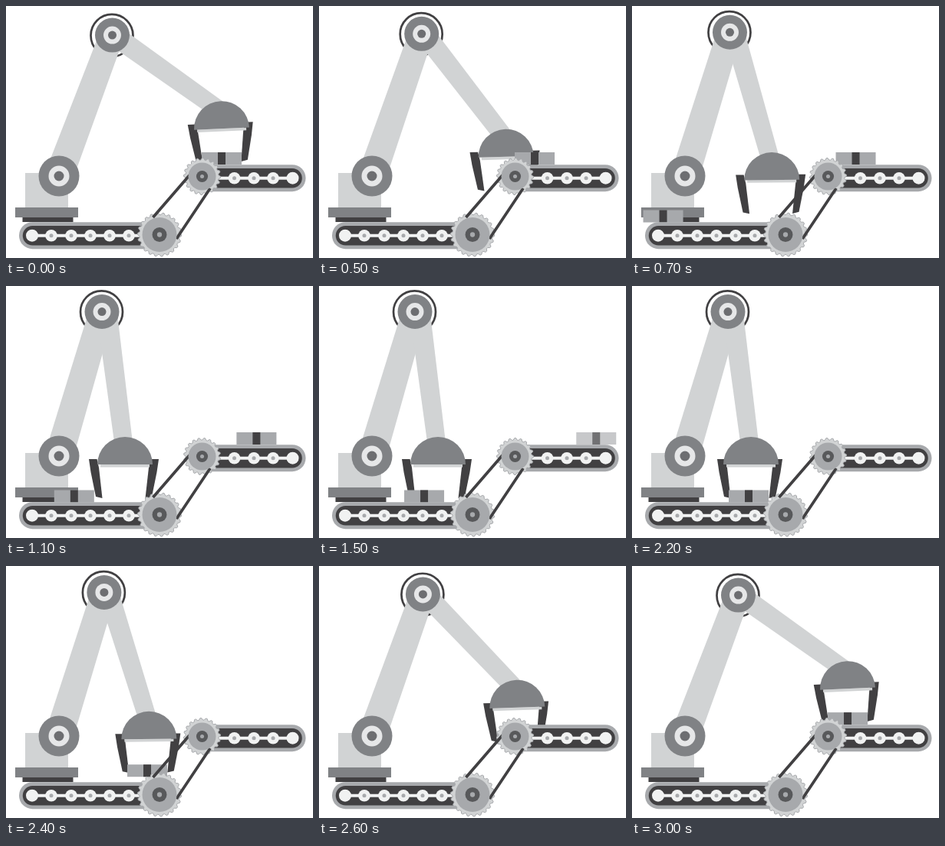
Write an HTML page with a canvas that moves like this. It is 400 px wide and 329 px high and loops after 3100 ms.

```html
<!DOCTYPE html>
<html lang="en">
<head>
<meta charset="utf-8">
<title>Robot arm and conveyors</title>
<style>
  html, body { margin: 0; width: 100%; height: 100%; overflow: hidden; background: #fff; }
  canvas { display: block; }
</style>
</head>
<body>
<canvas id="stage" width="400" height="329"></canvas>
<script>
const ctx = document.getElementById('stage').getContext('2d');
const LOOP = 3100;
const DARK = '#414042', STEEL = '#808285', MID = '#a7a9ac', LIGHT = '#d1d3d4', PALE = '#f1f2f2';
const SHOULDER = [69, 222], UPPER_LENGTH = 196.6, FORE_LENGTH = 170.3;

const lerp = (a, b, k) => a + (b - a) * k;
const ramp = (t, start, end) => Math.min(1, Math.max(0, (t - start) / (end - start)));
const smooth = k => k * k * (3 - 2 * k);
const radians = degrees => degrees * Math.PI / 180;

function rect(x, y, w, h, color) {
  ctx.fillStyle = color;
  ctx.fillRect(x, y, w, h);
}

function disc(x, y, r, color) {
  ctx.fillStyle = color;
  ctx.beginPath();
  ctx.arc(x, y, r, 0, 2 * Math.PI);
  ctx.fill();
}

function polygon(points, color) {
  ctx.fillStyle = color;
  ctx.beginPath();
  points.forEach(p => ctx.lineTo(...p));
  ctx.closePath();
  ctx.fill();
}

function line(x1, y1, x2, y2, width, color) {
  ctx.strokeStyle = color;
  ctx.lineWidth = width;
  ctx.beginPath();
  ctx.moveTo(x1, y1);
  ctx.lineTo(x2, y2);
  ctx.stroke();
}

// Limb outline in its own frame: x along the limb, y across it
function limb([x, y], angle, points) {
  ctx.save();
  ctx.translate(x, y);
  ctx.rotate(angle);
  polygon(points, LIGHT);
  ctx.restore();
}

function joint([x, y], r) {
  disc(x, y, r, STEEL);
  disc(x, y, r * 0.51, '#e6e7e8');
  disc(x, y, r * 0.245, '#6d6e71');
}

function conveyor(left, right, y, rollers, endRoller, gearX) {
  ctx.lineCap = 'round';
  line(left + 17.5, y, right - 17.5, y, 35, MID);
  line(left + 17.5, y, right - 17.5, y, 25.5, DARK);
  ctx.lineCap = 'butt';
  line(endRoller, y, gearX, y, 4, PALE);
  disc(endRoller, y, 8, PALE);
  for (const x of rollers) {
    disc(x, y, 7.8, PALE);
    disc(x, y, 2.5, MID);
  }
}

function teeth(x, y, r, count, turn) {
  const points = [];
  for (let i = 0; i < count * 4; i++) {
    const a = turn + i * Math.PI / (2 * count);
    const radius = i % 4 < 2 ? r : r - 2.5;
    points.push([x + radius * Math.cos(a), y + radius * Math.sin(a)]);
  }
  polygon(points, LIGHT);
  ctx.strokeStyle = MID;
  ctx.lineWidth = 1;
  ctx.stroke();
}

function hub(x, y, r) {
  disc(x, y, r, MID);
  disc(x, y, r * 0.42, '#58595b');
  disc(x, y, r * 0.14, MID);
}

function box(x, y, alpha) {
  ctx.globalAlpha = alpha;
  rect(x, y, 52, 16, MID);
  rect(x + 21, y, 10, 16, DARK);
  ctx.globalAlpha = 1;
}

function claw(side, open) {
  const shape = [[42.5, -7], [32, -7], [29.5, 4], [25, 44], [33.5, 42], [40, 10]];
  polygon(shape.map(([x, y]) => [side * (x + 3 * open) - 1.5, y]), DARK);
}

function head(x, y, tilt, open) {
  ctx.save();
  ctx.translate(x, y);
  ctx.rotate(tilt);
  claw(-1, open);
  claw(1, open);
  rect(-32, 0, 64, 3.5, LIGHT);
  ctx.fillStyle = STEEL;
  ctx.beginPath();
  ctx.arc(0, 0, 36, Math.PI, 2 * Math.PI);
  ctx.fill();
  ctx.restore();
}

// reach: 0 over the lower belt, 1 over the upper belt
function arm(reach, open) {
  const upper = radians(lerp(16.55, 20.7, reach));
  const fore = radians(lerp(10.9, 58.2, reach));
  const elbow = [SHOULDER[0] + UPPER_LENGTH * Math.sin(upper), SHOULDER[1] - UPPER_LENGTH * Math.cos(upper)];
  const pivot = [elbow[0] + 4, elbow[1] + 5];
  const x = pivot[0] + FORE_LENGTH * Math.sin(fore) - 6.2;
  const y = pivot[1] + FORE_LENGTH * Math.cos(fore) + 27.3;

  ctx.strokeStyle = DARK;
  ctx.lineWidth = 2.7;
  ctx.beginPath();
  ctx.arc(elbow[0] - 0.5, elbow[1] + 0.3, 27.5, 0, 2 * Math.PI);
  ctx.stroke();

  limb(SHOULDER, upper - Math.PI / 2, [[0, -18.5], [UPPER_LENGTH, -16.5], [UPPER_LENGTH, 15.5], [0, 18.5]]);
  limb(pivot, Math.PI / 2 - fore, [[0, -16.2], [175, -3.6], [175, 20], [0, 10.5]]);
  joint(elbow, 22.5);
  joint(SHOULDER, 26.5);
  head(x, y, radians(-2.5 * reach), open);
  return [x, y];
}

function draw(t) {
  const reach = t < 1500 ? 1 - smooth(ramp(t, 250, 870)) : smooth(ramp(t, 2250, 2760));
  const open = t < 1500 ? ramp(t, 50, 250) : 1 - ramp(t, 1700, 2050);
  const travel = ramp(t, 580, 1625);

  rect(0, 0, 400, 329, '#fff');
  rect(25, 218, 56, 45, LIGHT);
  rect(21.5, 276, 66, 6, DARK);
  rect(12, 263, 82, 13, STEEL);
  const [x, y] = arm(reach, open);

  if (t < 1625) box(255 + 91 * travel, 191, 1 - ramp(t, 1430, 1625));
  if (t > 2250) box(x - lerp(29, 26, reach), y + lerp(34, 31, reach), 1);
  else if (t > 580) box(126 * travel, 266.5, ramp(t, 580, 690));

  conveyor(17, 225, 299.7, [59, 85, 110, 135, 160], 34, 200);
  conveyor(240, 390.5, 224.7, [297.5, 323, 348], 373.5, 255);
  teeth(200, 298.5, 28.5, 22, 4.6 * travel);
  teeth(255.5, 222.5, 24, 20, 4.6 * travel);
  line(239, 221, 191.5, 276, 3.8, DARK);
  line(266, 238, 222, 304, 3.8, DARK);
  hub(200, 298.5, 22.5);
  hub(255.5, 222.5, 18);
}

function tick() {
  draw(performance.now() % LOOP);
  requestAnimationFrame(tick);
}
tick();
</script>
</body>
</html>
```
